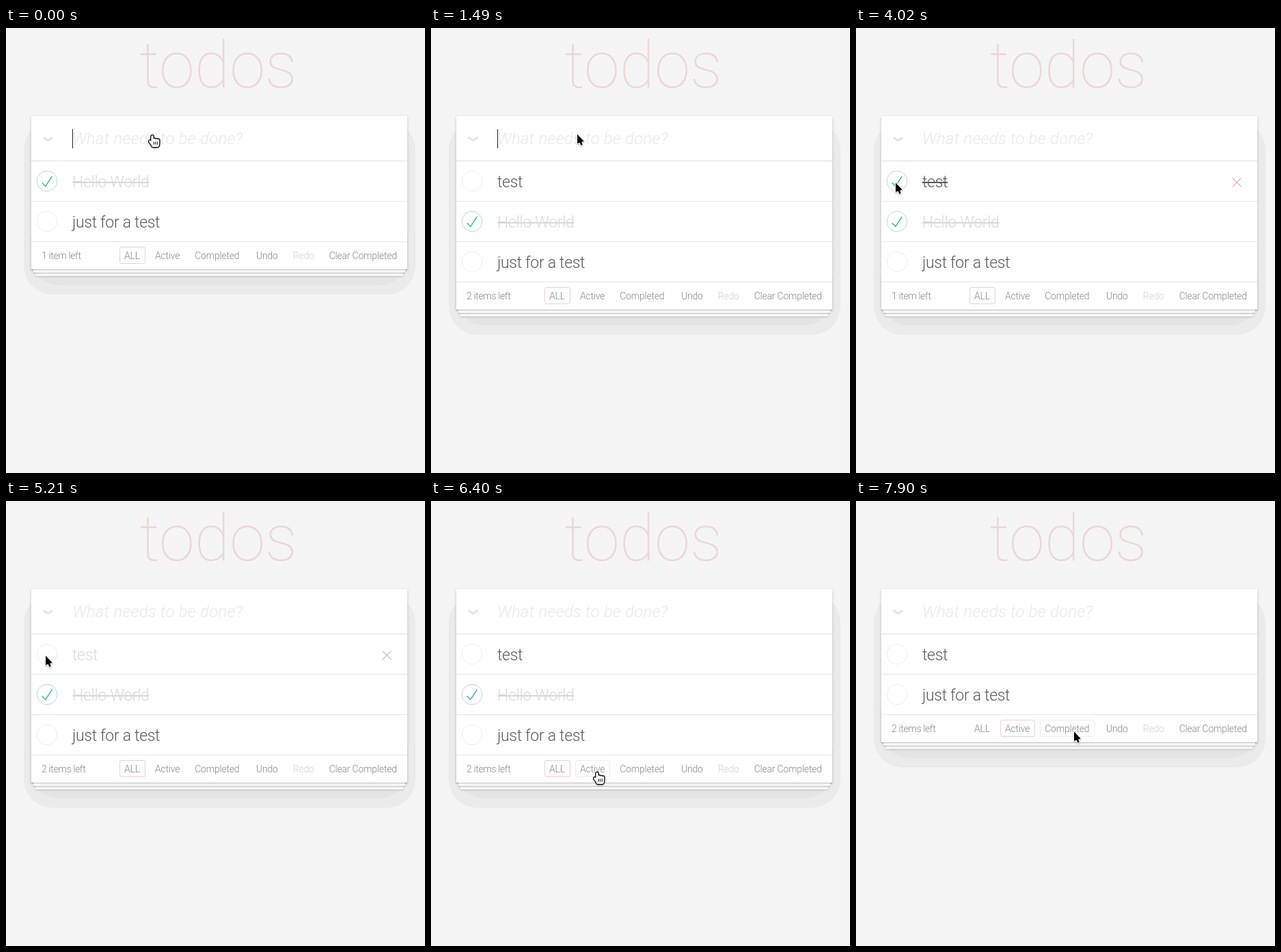
Animation of 613x651 px, one loop 8000 ms. Source, as an HTML page with a canvas:

```html
<!DOCTYPE html>
<html lang="en">
<head>
<meta charset="utf-8">
<title>todos</title>
<style>
  html, body { margin: 0; width: 100%; height: 100%; overflow: hidden; background: #f4f4f4; }
  canvas { display: block; }
</style>
</head>
<body>
<canvas id="stage" width="613" height="651"></canvas>
<script>
const ctx = document.getElementById('stage').getContext('2d');
const LOOP = 8000, TICK = 149;
const LEFT = 37, TOP = 129, WIDTH = 550, LIST = 195, ROW = 59, FOOT = 40;
const FAMILY = 'Roboto, "Helvetica Neue", "Liberation Sans", sans-serif';

// Moments, counted in ticks
const TYPE = 3, ADD = 10, BLUR = 26, CHECK = 27, UNCHECK = 35, POINT = 42, FILTER = 44, HOVER = 50;

const clamp = v => Math.max(0, Math.min(1, v));
const linear = t => t;
const easeInOut = t => t * t * (3 - 2 * t);
const easeOut = t => 1 - (1 - t) ** 3;

const FIELD = [213, 155], CIRCLE = [57, 226], ACTIVE = [242, 395], COMPLETED = [318, 337];
const MOVES = [
  { from: FIELD, via: [227, 247], to: CIRCLE, start: 16, end: 24, ease: linear },
  { from: CIRCLE, via: [150, 311], to: ACTIVE, start: 35, end: 41, ease: easeInOut },
  { from: ACTIVE, via: [280, 366], to: COMPLETED, start: 46, end: 53, ease: easeOut }
];

function pointerAt(k) {
  const m = MOVES.findLast(m => k >= m.start) || MOVES[0];
  const t = m.ease(clamp((k - m.start) / (m.end - m.start))), u = 1 - t;
  return [0, 1].map(i => u * u * m.from[i] + 2 * u * t * m.via[i] + t * t * m.to[i]);
}

function text(str, x, y, size, color, { weight = 300, style = '', spacing = 0, align = 'left' } = {}) {
  ctx.font = `${style} ${weight} ${size}px ${FAMILY}`;
  ctx.letterSpacing = spacing + 'px';
  ctx.textAlign = align;
  ctx.fillStyle = color;
  const w = ctx.measureText(str).width;
  ctx.fillText(str, align === 'right' ? x + spacing : x, y);
  return w;
}

function rect(x, y, w, h, color) {
  ctx.fillStyle = color;
  ctx.fillRect(x, y, w, h);
}

function rounded(x, y, w, h, r, color) {
  ctx.fillStyle = color;
  ctx.beginPath();
  ctx.roundRect(x, y, w, h, r);
  ctx.fill();
}

function shadowRect(x, y, w, h, color, dy, blur) {
  ctx.save();
  ctx.shadowColor = 'rgba(0,0,0,.2)';
  ctx.shadowOffsetY = dy;
  ctx.shadowBlur = blur;
  rect(x, y, w, h, color);
  ctx.restore();
}

function line(points, color, width = 1) {
  ctx.beginPath();
  points.forEach(p => ctx.lineTo(...p));
  ctx.strokeStyle = color;
  ctx.lineWidth = width;
  ctx.stroke();
}

function card(bottom) {
  rounded(26, 136, 573, bottom + 37 - 136, 42, '#ebebeb');
  rounded(38, 145, 548, bottom + 23 - 145, 38, '#e5e5e5');
  shadowRect(LEFT, TOP, WIDTH, bottom - TOP, '#fff', 2, 4);
  for (const i of [2, 1]) {
    const inset = 3 * i;
    shadowRect(LEFT + inset, bottom - 30, WIDTH - 2 * inset, 30 + 5 * i, '#f6f6f6', 1, i);
  }
  shadowRect(LEFT, bottom - 50, WIDTH, 50, '#fff', 1, 1);
  rect(LEFT, TOP, WIDTH, bottom - TOP, '#fefefe');
}

function header(k) {
  line([[54.5, 160], [61.5, 164.5], [68.5, 160]], '#e4e4e4', 3);

  let caret = 97;
  if (k >= TYPE && k < ADD) {
    caret += text('test'.slice(0, k - TYPE + 1), 97, 170, 23, '#5a5a5a', { spacing: -0.3 });
  } else {
    text('What needs to be done?', 97, 170, 24, '#e8e8e8', { style: 'italic', spacing: 0.2 });
  }
  const blinkOn = k < ADD || (k - ADD) % 7 < 4;
  if (k < BLUR && blinkOn) rect(Math.round(caret), 148, 1, 28, '#222');
  rect(LEFT, 194, WIDTH, 1, '#e0e0e0');
}

function item(y, { label, done, fade }, hover) {
  const cy = y + 29;
  ctx.lineWidth = 1;
  ctx.strokeStyle = done ? '#b5dbd2' : '#ededed';
  ctx.beginPath();
  ctx.arc(60, cy, 14.8, 0, 7);
  ctx.stroke();
  if (done) line([[52.7, cy + 2.4], [57.8, cy + 7.5], [67.3, cy - 7]], '#4dbfac', 1.7);

  const v = Math.round(90 + 127 * fade), color = `rgb(${v},${v},${v})`;
  const w = text(label, 97, y + 38, 23, color, { spacing: -0.3 });
  if (done) rect(97, y + 30, w, 2, color);

  if (hover) {
    const cx = 557.2, my = y + 30.7, r = 6.3;
    for (const s of [-1, 1]) line([[cx - r, my - s * r], [cx + r, my + s * r]], '#cc8f8f');
  }
}

function footer(bottom, left, selected, hovered) {
  const base = bottom - 15, gap = 22, style = { spacing: -0.2 };
  const count = left === 1 ? '1 item left' : left + ' items left';
  text(count, 52, base, 14, '#888', { spacing: -0.35 });

  let x = 173;
  for (const label of ['ALL', 'Active', 'Completed']) {
    const w = text(label, x, base, 14, '#888', style);
    if (label === selected || label === hovered) {
      const boxX = Math.round(x - 7) + 0.5;
      ctx.lineWidth = 1;
      ctx.strokeStyle = label === selected ? '#ecd0ce' : '#f5e8e8';
      ctx.beginPath();
      ctx.roundRect(boxX, bottom - 32.5, Math.round(w + 14), 24, 2.5);
      ctx.stroke();
    }
    x += w + gap;
  }

  x = 572;
  for (const label of ['Clear Completed', 'Redo', 'Undo']) {
    const color = label === 'Redo' ? '#d2d2d2' : '#888';
    x -= text(label, x, base, 14, color, { ...style, align: 'right' }) + gap;
  }
}

function cursor(path, x, y, outline, fill, width) {
  ctx.save();
  ctx.translate(x, y);
  ctx.lineJoin = 'round';
  ctx.lineWidth = width;
  ctx.strokeStyle = outline;
  ctx.fillStyle = fill;
  ctx.shadowColor = 'rgba(0,0,0,.35)';
  ctx.shadowBlur = 2;
  ctx.shadowOffsetY = 1;
  ctx.stroke(path);
  ctx.shadowColor = 'transparent';
  ctx.fill(path);
  ctx.restore();
}

const ARROW = new Path2D('M0 0V13.5L9.7 9.9Z M2.8 9L5.3 16.3L7.7 15.3L5 8Z');

const HAND = new Path2D();
HAND.ellipse(-2.3, 10.5, 1.6, 3.6, -0.6, 0, 7);
HAND.roundRect(-1.6, 0, 3.2, 12, 1.6);
for (let i = 1; i < 4; i++) HAND.roundRect(-1.6 + 2.9 * i, 4 + 0.5 * i, 3.2, 8, 1.6);
HAND.roundRect(-1.4, 7.5, 11.5, 9.5, 3);

function hand(x, y) {
  cursor(HAND, x, y, '#000', '#fff', 2.4);
  for (let i = 0; i < 3; i++) rect(x + 1.8 + 2.5 * i, y + 9.5, 1, 4, '#000');
}

function draw(t) {
  const k = Math.min(53, Math.floor((t + 10) / TICK));
  const added = k >= ADD, filtered = k >= FILTER;
  const done = k >= CHECK && k < UNCHECK;
  const fade = clamp((k - CHECK) / 3) - clamp((k - UNCHECK) / 3);

  let items = [
    { label: 'test', done, fade },
    { label: 'Hello World', done: true, fade: 1 },
    { label: 'just for a test', done: false, fade: 0 }
  ];
  if (!added) items.shift();
  const left = items.filter(i => !i.done).length;
  if (filtered) items = items.filter(i => !i.done);

  const bottom = LIST + items.length * ROW + FOOT;
  const [x, y] = pointerAt(k);
  const hoverRow = added ? Math.floor((y - LIST) / ROW) : -1;
  const pointing = k >= POINT && k < FILTER;
  const hovered = pointing ? 'Active' : k >= HOVER ? 'Completed' : '';

  rect(0, 0, 613, 651, '#f4f4f4');
  text('todos', 310.5, 87, 94, '#ead6d6', { weight: 100, align: 'center' });
  card(bottom);
  header(k);
  items.forEach((it, i) => {
    const rowY = LIST + i * ROW;
    item(rowY, it, i === hoverRow);
    rect(LEFT, rowY + ROW - 1, WIDTH, 1, '#e6e6e6');
  });
  footer(bottom, left, filtered ? 'Active' : 'ALL', hovered);

  if (k < TYPE) hand(FIELD[0] + 1, FIELD[1] + 2);
  else if (pointing) hand(x + 1, y + 2);
  else if (added) cursor(ARROW, x + 1, y + 0.5, '#fff', '#000', 2);
}

const start = performance.now();
function loop() {
  draw((performance.now() - start) % LOOP);
  requestAnimationFrame(loop);
}
loop();
</script>
</body>
</html>
```
